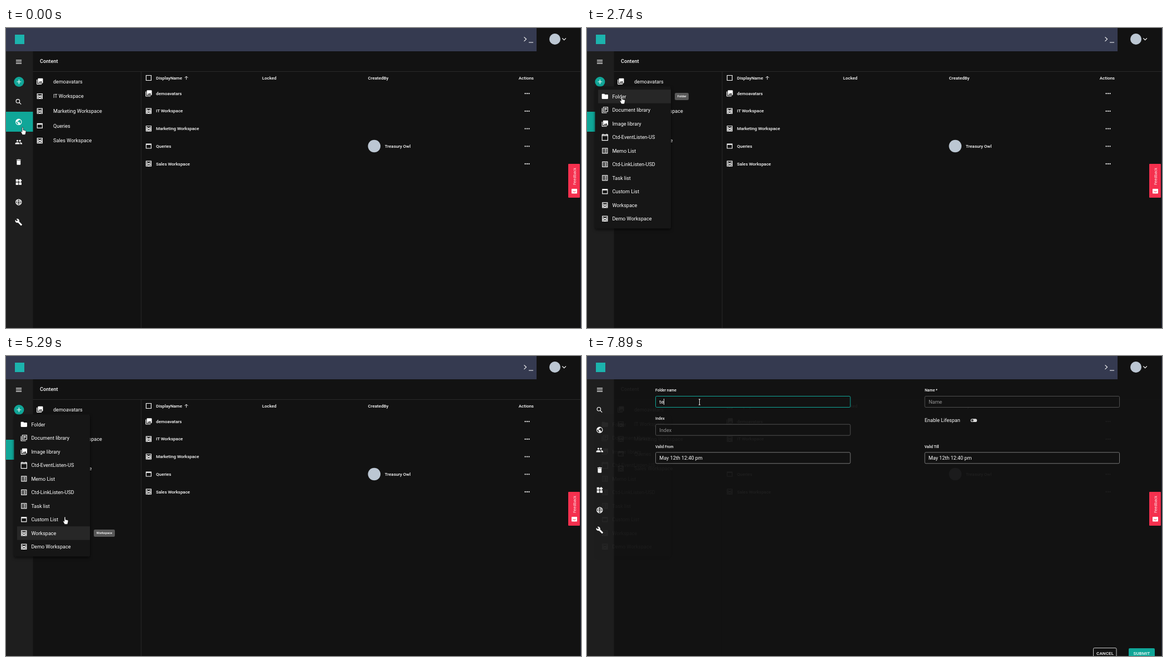
These frames come from a looping animation (1035x541 px, 8 s). An HTML page:

```html
<!DOCTYPE html>
<html lang="en">
<head>
<meta charset="utf-8">
<title>Add new folder</title>
<style>
html, body { margin: 0; width: 100%; height: 100%; overflow: hidden; background: #121212; }
svg { position: absolute; left: 0; top: 0; }
svg, .tip { font-family: Roboto, sans-serif; }
.tip {
  position: absolute; box-sizing: border-box; height: 12.5px; padding: 0 4.5px; border-radius: 2.3px;
  background: rgba(97, 97, 97, .9); color: #fff; font-size: 5.67px; font-weight: 500; line-height: 12.5px;
  white-space: nowrap; transform-origin: left center; opacity: 0;
}
</style>
</head>
<body>
<svg id="stage" width="1035" height="541" viewBox="0 0 1035 541">
  <defs><filter id="shade" x="-10%" y="-10%" width="120%" height="120%">
    <feDropShadow dx="0" dy="2.5" stdDeviation="2.5" flood-color="#000" flood-opacity=".6"/>
  </filter></defs>
  <g id="side"></g>
  <g id="page"></g>
  <g id="form"></g>
  <g id="top"></g>
  <g id="menu"></g>
</svg>
<div id="tips"></div>
<svg id="pointer" width="1035" height="541" viewBox="0 0 1035 541"></svg>

<script>
const TEAL = '#10a698', LOOP = 8000, STEP = 70;
const $ = id => document.getElementById(id);

// 24-unit icons; a leading "~" means the path is stroked.
const ICONS = {
  burger: '~M3 7h18M3 12h18M3 17h18',
  add: '~M12 5v14M5 12h14',
  search: '~M3.8 9.5a5.7 5.7 0 1 0 11.4 0a5.7 5.7 0 1 0-11.4 0M14 14l5.8 5.8',
  earth: 'M12 2C6.48 2 2 6.48 2 12s4.48 10 10 10 10-4.48 10-10S17.52 2 12 2zm-1 17.93c-3.95-.49-7-3.85-7-7.93 0-.62.08-1.21.21-1.79L9 15v1c0 1.1.9 2 2 2v1.93zm6.9-2.54c-.26-.81-1-1.39-1.9-1.39h-1v-3c0-.55-.45-1-1-1H8v-2h2c.55 0 1-.45 1-1V7h2c1.1 0 2-.9 2-2v-.41c2.93 1.19 5 4.06 5 7.41 0 2.08-.8 3.97-2.1 5.39z',
  people: 'M13 8a3 3 0 1 0 6 0a3 3 0 1 0-6 0M5 8a3 3 0 1 0 6 0a3 3 0 1 0-6 0M8 13c-2.33 0-7 1.17-7 3.5V19h14v-2.5C15 14.17 10.33 13 8 13zM16 13l-1 .05c1.16.84 2 1.97 2 3.45V19h6v-2.5C23 14.17 18.33 13 16 13z',
  trash: 'M6 19c0 1.1.9 2 2 2h8c1.1 0 2-.9 2-2V7H6v12zM19 4h-3.5l-1-1h-5l-1 1H5v2h14V4z',
  widgets: 'M13 13v8h8v-8h-8zM3 21h8v-8H3v8zM3 3v8h8V3H3zm13.66-1.31L11 7.34 16.66 13l5.66-5.66-5.66-5.65z',
  globe: '~M3 12a9 9 0 1 0 18 0a9 9 0 1 0-18 0M8 12a4 9 0 1 0 8 0a4 9 0 1 0-8 0M4 9h16M4 15h16',
  wrench: 'M22.7 19l-9.1-9.1c.9-2.3.4-5-1.5-6.9-2-2-5-2.4-7.4-1.3L9 6 6 9 1.6 4.7C.4 7.1.9 10.1 2.9 12.1c1.9 1.9 4.6 2.4 6.9 1.5l9.1 9.1c.4.4 1 .4 1.4 0l2.3-2.3c.5-.4.5-1.1.1-1.4z',
  folder: 'M10 4H4c-1.1 0-2 .9-2 2v12c0 1.1.9 2 2 2h16c1.1 0 2-.9 2-2V8c0-1.1-.9-2-2-2h-8l-2-2z',
  docs: '~M3 6v15h15M7 3h14v14H7zM10 7h8M10 10h8M10 13h4',
  images: 'M22 16V4c0-1.1-.9-2-2-2H8c-1.1 0-2 .9-2 2v12c0 1.1.9 2 2 2h12c1.1 0 2-.9 2-2zm-11-4l2.03 2.71L16 11l4 5H8l3-4zM2 6v14c0 1.1.9 2 2 2h14v-2H4V6H2z',
  calendar: '~M3 4h18v18H3zM3 7h18M6 1v4M18 1v4',
  list: '~M4 4h16v16H4zM7 8h2M11 8h6M7 12h2M11 12h6M7 16h2M11 16h6',
  window: '~M4 5h16v14H4zM4 7h16',
  inbox: '~M4 4h16v16H4zM4 9h5a3 3 0 0 0 6 0h5M4 13h16M4 16h5a3 3 0 0 0 6 0h5',
  box: '~M4 4h16v16H4z',
  up: '~M12 19V6M5.5 12l6.5-6.5 6.5 6.5'
};

const rect = (x, y, w, h, fill, more = '') =>
  `<rect x="${x}" y="${y}" width="${w}" height="${h}" fill="${fill}" ${more}/>`;
const line = (d, color = '#fff', w = 1.1) =>
  `<path d="${d}" fill="none" stroke="${color}" stroke-width="${w}"/>`;
const disc = (x, y, r, fill) => `<circle cx="${x}" cy="${y}" r="${r}" fill="${fill}"/>`;
// cy is the middle of the capitals.
const text = (s, x, cy, size = 9.07, weight = 400, more = '') =>
  `<text x="${x}" y="${cy + size * .355}" font-size="${size}" font-weight="${weight}" fill="#fff" ${more}>${s}</text>`;
function icon(name, cx, cy, k = .567) {
  const d = ICONS[name], stroked = d[0] === '~';
  const paint = stroked ? 'fill="none" stroke="#fff" stroke-width="2"' : 'fill="#fff"';
  return `<path transform="translate(${cx - 12 * k} ${cy - 12 * k}) scale(${k})" d="${stroked ? d.slice(1) : d}" ${paint}/>`;
}

// Sidebar
const sideY = i => 61 + i * 36.15;
const tools = ['search', 'earth', 'people', 'trash', 'widgets', 'globe', 'wrench'];
$('side').innerHTML = rect(0, 42, 48.5, 499, '#1e1e1e') +
  rect(0, 0, 48.5, 36, '#323232', 'id="hover"') + icon('burger', 23, 61) +
  `<g id="plus">${disc(23.4, 97, 9, TEAL)}${icon('add', 23.4, 97)}</g>` +
  `<g id="tools">${rect(0, 151, 48.5, 36, TEAL, 'id="active"')}` +
  tools.map((n, i) => icon(n, 22.8, sideY(i + 2))).join('') + '</g>';

// Header and feedback tab
$('top').innerHTML = rect(0, 0, 955, 42, '#353a50') + rect(955, 0, 80, 42, '#121212') +
  rect(1034, 0, 1, 541, '#23263a') + rect(16, 12, 17, 17, '#1cb3ad') +
  line('M932.5 16.3l4 3.8-4 3.8M941 26h8') + disc(988, 20, 10, '#bcc7d3') +
  line('M1001.3 18.4l3.3 3.3 3.3-3.3', '#fff', 1.2) +
  rect(1012, 245, 21, 61, '#f5304e', 'rx="1"') +
  `<text transform="translate(1025.6 283) rotate(-90)" font-family="Open Sans, sans-serif" font-size="7" fill="#fff">Feedback</text>` +
  rect(1018, 290, 10, 8.5, '#fff', 'rx=".8"') + line('M1020.6 294a2.5 2.2 0 0 0 4.8 0', '#f5304e', 1);

// Content browser
const rows = [['images', 'demoavatars'], ['inbox', 'IT Workspace'], ['inbox', 'Marketing Workspace'],
  ['window', 'Queries'], ['inbox', 'Sales Workspace']];
const cell = (s, x, y) => text(s, x, y, 7.94, 500);
$('page').innerHTML = text('Content', 61, 59.8, 9.07, 500, 'letter-spacing=".08"') +
  rect(48.5, 78, 986, 1, '#2a2a2a') + rect(242.7, 79, 1, 462, '#2a2a2a') +
  icon('box', 256.8, 90) + cell('DisplayName', 270, 90) + icon('up', 324.6, 90, .45) +
  cell('Locked', 461, 90) + cell('CreatedBy', 651.6, 90) + cell('Actions', 922.8, 90) +
  rows.map(([n, s], i) => {
    const y = 96.3 + i * 26.7, ty = 117.9 + i * 31.7;
    return icon(n, 60.8, y) + text(s, 85, y) + icon(n, 256.8, ty) + cell(s, 270, ty) +
      [-3.4, 0, 3.4].map(d => disc(938 + d, ty + .3, 1.15, '#fff')).join('');
  }).join('') + disc(662.8, 213, 11.3, '#bcc7d3') + cell('Treasury Owl', 681.8, 213);

// Folder form
const label = (s, x, y) => text(s, x, y, 6.8, 500);
const field = (x, y, color, id = '') => rect(x + .5, y + .5, 350.5, 20, '#121212', `rx="2" stroke="${color}" ${id}`);
const hint = (s, x, y, id = '') => text(s, x, y, 9.07, 400, `opacity=".55" ${id}`);
$('form').innerHTML =
  label('Folder name', 123, 62) + field(123, 72, '#505050', 'id="nameBox"') + hint('Folder name', 130.3, 82.7, 'id="nameHint"') +
  text('', 130.3, 82.7, 9.07, 400, 'id="typed"') + rect(130, 77, .9, 11, '#fff', 'id="caret"') +
  label('Name *', 608, 62) + field(607.5, 72, '#505050') + hint('Name', 615, 82.7) +
  label('Index', 123, 112.7) + field(123, 122.7, '#505050') + hint('Index', 130.3, 133.3) +
  text('Enable Lifespan', 607.7, 115.6) + rect(690.5, 113.3, 11.5, 5.8, '#dcdcdc', 'rx="2.9"') + disc(693.6, 116.2, 2.1, '#444') +
  [['Valid From', 123], ['Valid Till', 607.5]].map(([s, x]) =>
    label(s, x, 163.3) + field(x, 173.3, '#787878') + text('May 12th 12:40 pm', x + 7.3, 183.9)).join('') +
  rect(911.5, 526.5, 41.5, 20, 'none', 'rx="2" stroke="#c8c8c8"') + text('CANCEL', 917, 536.6, 7.94, 500, 'letter-spacing=".2"') +
  rect(975, 527, 47, 20, TEAL, 'rx="2"') + text('SUBMIT', 983.6, 536.6, 7.94, 500, 'letter-spacing=".15"');

// Drop-down menu with one tooltip for each item
const items = [['folder', 'Folder'], ['docs', 'Document library'], ['images', 'Image library'],
  ['calendar', 'Ctd-EventListen-US'], ['list', 'Memo List'], ['list', 'Ctd-LinkListen-USD'], ['list', 'Task list'],
  ['window', 'Custom List'], ['inbox', 'Workspace'], ['inbox', 'Demo Workspace']];
const PITCH = 24.5, itemY = i => 123.4 + i * PITCH;
$('menu').innerHTML = rect(14.5, 105.5, 136.5, 256, '#121212', 'rx="2" filter="url(#shade)"') +
  rect(20, 0, 131, PITCH, '#272727', 'id="pick"') +
  items.map(([n, s], i) => icon(n, 32.3, itemY(i)) + text(s, 45.4, itemY(i))).join('');

function addTip(s, x, y) {
  const el = document.createElement('div');
  el.className = 'tip';
  el.textContent = s;
  el.style.left = x + 'px';
  el.style.top = y - 6.25 + 'px';
  return $('tips').appendChild(el);
}
const tips = items.map(([, s], i) => addTip(s, 158.3, itemY(i) + .2));
const plusTip = addTip('Add new', 44.4, 97);

// Pointer shapes, with the hot spot at 0,0
$('pointer').innerHTML = '<g id="cursor">' +
  '<path id="arrow" d="M0 0V9.6L2.2 7.6 3.7 11 5.3 10.3 3.8 7H6.8Z" fill="#fff" stroke="#000" stroke-width=".6"/>' +
  '<path id="hand" d="M-1 1a1 1 0 0 1 2 0v4l4 1a1.4 1.4 0 0 1 1 1.5L5.4 11l-.9 2.4h-5L-3.2 8.6a.9.9 0 0 1 1.3-1.1L-1 8.4Z" fill="#fff" stroke="#000" stroke-width=".6"/>' +
  '<path id="beam" d="M-1.6-5h3.2M0-5V5M-1.6 5h3.2" stroke="#fff" stroke-width=".9"/></g>';

// Pointer moves as [time, x, y]; each is held in steps.
const moves = [
  [[130, 30, 179], [340, 31, 165], [620, 29, 115], [830, 27, 97]],
  [[2110, 27, 97], [2460, 45, 113], [2740, 62.5, 123.5]],
  [[3070, 62.5, 123.5], [3420, 72, 140], [3630, 81, 156], [3700, 84, 163], [3770, 86, 170], [3910, 91, 201],
    [4330, 98, 277], [4400, 99, 295], [4680, 113, 340], [4820, 117, 349]],
  [[5080, 117, 349], [5290, 106, 290], [5570, 78, 160], [5640, 72, 135], [5780, 67, 128]],
  [[6380, 67, 128], [6660, 110, 112], [6940, 185, 88], [7080, 202.5, 83]]
];
function pos(t) {
  const m = moves.filter(m => t >= m[0][0]).pop() || moves[0];
  const q = m[0][0] + Math.max(0, Math.floor((t - m[0][0]) / STEP)) * STEP;
  const i = m.findIndex(k => k[0] > q);
  if (i < 0) return m[m.length - 1].slice(1);
  if (i === 0) return m[0].slice(1);
  const [a, b] = [m[i - 1], m[i]], f = (q - a[0]) / (b[0] - a[0]);
  return [a[1] + (b[1] - a[1]) * f, a[2] + (b[2] - a[2]) * f];
}

const OPEN = 1430, CLICK = 6040, FORM = 6110;
function picked(t) {
  const i = Math.floor((pos(t - STEP)[1] - 111) / PITCH);
  return t >= 1570 && t < FORM && i >= 0 && i < items.length ? i : -1;
}
const onPlus = t => t < OPEN && pos(t - STEP)[1] < 115;
const show = (id, on) => $(id).setAttribute('opacity', Number(on));
function fadeTip(el, o) {
  el.style.opacity = o;
  el.style.transform = `scale(${.9 + .1 * o})`;
}

function draw(t) {
  const [x, y] = pos(t), form = t >= FORM;

  const row = Math.floor((y - 79) / 36.15);
  show('hover', t < OPEN && row < 2);
  $('hover').setAttribute('y', 79 + row * 36.15);
  show('plus', !form);
  $('tools').setAttribute('transform', `translate(0 ${form ? -36.15 : 0})`);
  show('active', t < 6180 ? 1 : t < 6250 ? .5 : 0);

  // A faint trace of the browser stays behind the form.
  show('page', form ? .05 : t >= CLICK ? .5 : 1);
  show('form', form);
  const grow = t < OPEN ? 0 : t < 1500 ? .35 : t < 1570 ? .8 : 1;
  show('menu', form ? .04 : t >= CLICK ? .5 : grow);
  const sx = .75 + .25 * grow, sy = .56 + .44 * grow;
  $('menu').setAttribute('transform', `translate(${14.5 * (1 - sx)} ${105.5 * (1 - sy)}) scale(${sx} ${sy})`);

  const now = picked(t), before = picked(t - STEP);
  show('pick', now >= 0);
  $('pick').setAttribute('y', 111.2 + Math.max(now, 0) * PITCH);
  tips.forEach((el, i) => fadeTip(el, form ? 0 : ((now === i) + (before === i)) / 2));
  fadeTip(plusTip, (onPlus(t) + onPlus(t - STEP)) / 2);

  const typed = t >= 7890 ? 'te' : t >= 7820 ? 't' : '';
  $('typed').textContent = typed;
  show('nameHint', typed ? 0 : .55);
  $('nameBox').setAttribute('stroke', t >= 7220 ? TEAL : '#505050');
  show('caret', t >= 7220 && (t < 7560 || typed));
  $('caret').setAttribute('x', typed ? 130.3 + $('typed').getComputedTextLength() : 130);

  const beam = form && x > 123 && y > 72 && y < 93;
  const hand = t < OPEN ? y > 115 : !form && y > 111;
  show('beam', beam);
  show('hand', hand);
  show('arrow', !beam && !hand);
  $('cursor').setAttribute('transform', `translate(${x} ${y})`);
}

function tick() {
  draw(performance.now() % LOOP);
  requestAnimationFrame(tick);
}
tick();
</script>
</body>
</html>
```
